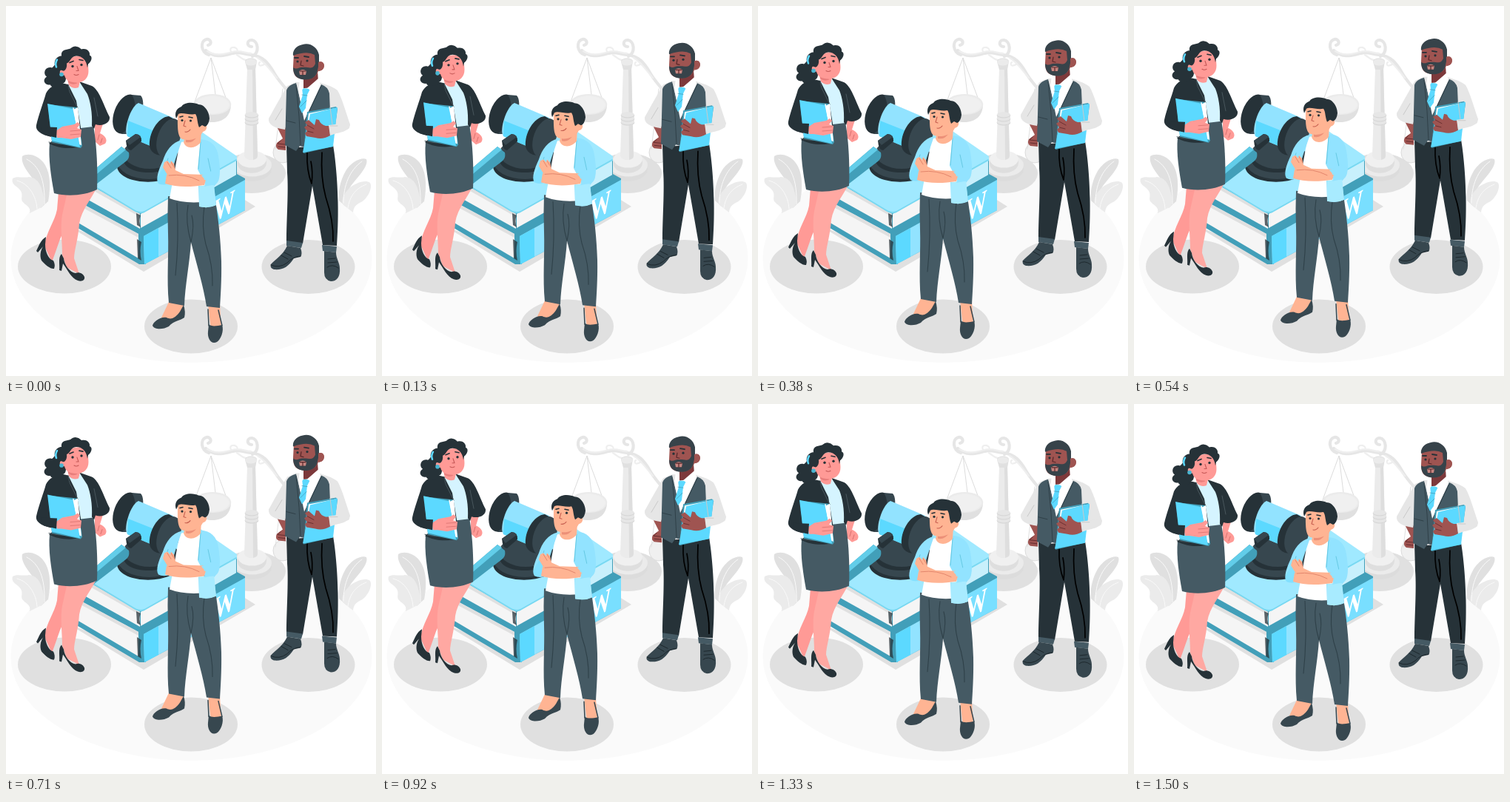
Write an HTML page that moves like this. It is 500 px wide and 500 px high and loops after 1.54 s.

```html
<!DOCTYPE html>
<html lang="en">
<head>
<meta charset="utf-8">
<title>Law team</title>
<style>
html, body { margin: 0; width: 100%; height: 100%; overflow: hidden; background: #fff; }
svg { display: block; width: 100vw; height: 100vh; }
.dark { fill: #263238; }
.slate { fill: #455a64; }
.shoe { fill: #37474f; }
.sky { fill: #5cd9ff; }
.ice { fill: #92e3ff; }
.teal { fill: #429fb9; }
.white { fill: #fff; }
.paper { fill: #f5f5f5; }
.shade { fill: #e0e0e0; }
.pink { fill: #ff9a96; }
.rose { fill: #ffa8a2; }
.peach { fill: #ffb493; }
.brown { fill: #9f5451; }
.deep { fill: #7d393b; }
.ln { fill: none; stroke-linecap: round; stroke-linejoin: round; }
</style>
</head>
<body>
<svg viewBox="0 0 500 500" xmlns="http://www.w3.org/2000/svg">
  <ellipse cx="250.5" cy="341" rx="244" ry="141" fill="#fafafa"/>

  <g id="plants">
    <path fill="#e0e0e0" d="M22 203C29 198 45 201 53 215C61 229 60 248 57 264L47 273C44 262 47 251 42 242C35 230 19 215 22 203Z"/>
    <path fill="#ebebeb" d="M9 233C14 229 25 233 31 231C40 231 47 240 49 250C52 259 52 266 50 271L32 280C34 271 27 270 24 266C18 261 24 257 20 250C17 244 6 242 9 233Z"/>
    <path class="ln" stroke="#fafafa" d="M28 207C45 216 53 235 52 268M15 236C31 240 41 257 42 274"/>
    <path fill="#e0e0e0" d="M487 207C480 204 466 211 459 223C451 237 449 251 450 263L459 271C465 262 461 252 465 245C472 234 491 217 487 207Z"/>
    <path fill="#ebebeb" d="M492 239C486 234 472 239 464 246C456 254 453 262 455 268L469 279C470 270 474 268 480 265C488 261 496 246 492 239Z"/>
    <path class="ln" stroke="#fafafa" d="M481 210C464 222 456 243 456 266M487 241C470 247 464 260 462 273"/>
  </g>

  <g id="shadows" class="shade">
    <ellipse cx="79" cy="352" rx="63" ry="36.5"/>
    <ellipse cx="408.5" cy="352.5" rx="63" ry="36.5"/>
    <ellipse cx="250" cy="433" rx="63" ry="36.5"/>
    <ellipse cx="332" cy="226" rx="46" ry="27"/>
    <path d="M84 297L186 359L337 271L318 259L180 335Z"/>
  </g>

  <g id="scale">
    <path class="ln" stroke="#e6e6e6" stroke-width="4.2" d="M274 66C263 63 262 47 271 45C277 44 279 52 273 53M270 60C283 72 297 66 306 64C317 61 323 66 331 66C347 67 355 78 362 90C367 99 373 105 379 113M333 68C343 63 341 47 332 46C325 46 325 55 332 55"/>
    <path class="ln" stroke="#efefef" stroke-width="2.3" d="M272 61C285 69 298 64 306 62C317 59 323 64 331 64M304 62C300 54 313 54 313 61M340 70C352 77 360 91 366 97M312 66C320 72 323 74 329 73M350 78C342 84 340 78 343 76"/>
    <path fill="none" stroke="#dcdcdc" d="M277 70L254 132M277 70L300 132M277 70L283 120"/>
    <path fill="#e0e0e0" d="M253.5 133C253 149 265 157 279 157C294 157 304 148 304 133Z"/>
    <ellipse cx="279" cy="133" rx="25.3" ry="14" fill="#ebebeb"/>
    <ellipse cx="279" cy="133.5" rx="23" ry="12" fill="#f0f0f0"/>
    <ellipse cx="374" cy="198" rx="13" ry="14" fill="#f0f0f0" stroke="#dcdcdc"/>
    <path class="ln" stroke="#e0e0e0" d="M374 112L364 193"/>
    <path fill="#dcdcdc" d="M307 216V222C308 242 358 242 359 220V213Z"/>
    <ellipse cx="333" cy="215" rx="26" ry="15.5" fill="#ebebeb"/>
    <path fill="#dedede" d="M313 208V214C315 230 351 230 352 212V206Z"/>
    <ellipse cx="332.5" cy="207" rx="19.5" ry="11.5" fill="#f0f0f0"/>
    <path fill="#ebebeb" d="M326 84H337L340 202C340 210 323 210 322 202Z"/>
    <path fill="#dedede" d="M333 84H337L340 202C340 206 337 207 334 208Z"/>
    <path fill="#e6e6e6" d="M323 147C323 142 340 142 341 147V158C340 163 324 163 323 158Z"/>
    <path class="ln" stroke="#d5d5d5" d="M323 148C325 152 339 152 341 148M323 153C325 157 339 157 341 153M323 158C325 162 339 162 341 158"/>
    <path fill="#e0e0e0" d="M323 75C323 69 339 69 339 75L337 86H326Z"/>
    <ellipse cx="331" cy="76" rx="8" ry="4.5" fill="#ebebeb"/>
  </g>

  <g id="books">
    <path class="teal" d="M93 268L104 258L181 300L312 227L323 233V276L187 349L180 349L92 297V290L97 291L96 272Z"/>
    <path class="paper" d="M97 264L179 308V341L96 292Z"/>
    <path class="shade" d="M97 264L179 308V313L97 269Z"/>
    <path class="teal" d="M179 312Q186 309 189 309V349L179 348Z"/>
    <path class="dark" opacity=".75" d="M177 315L183 319Q180 331 183 344L178 341Z"/>
    <path class="ice" d="M186 311L323 235V276L187 349Z"/>
    <path class="sky" d="M186 311L206 300V339L187 349Z"/>
    <path class="sky" opacity=".45" d="M264 268L323 235V276L264 308Z"/>
    <text text-anchor="end" transform="matrix(.7 -.4 0 1 310 275.5)" font-family="'Liberation Serif', 'Noto Serif', serif" font-weight="700" font-size="42" fill="#fff">LAW</text>
    <path class="teal" d="M103 257L114 240L180 279L312 205V229L181 304L103 262Z"/>
    <path class="paper" d="M114 242L181 281V301L104 258Z"/>
    <path class="shade" d="M114 242L181 281V285L112 246Z"/>
    <path class="dark" opacity=".75" d="M176 280L182 283Q179 290 182 299L177 296Z"/>
    <path class="paper" d="M182 281L311 207V228L182 300Z"/>
    <path fill="#c8f0fc" d="M264 236L311 207V228L264 255Z"/>
    <path fill="#a0e9ff" d="M114 239L246 163Q251 161 257 165L312 203V209L187 278Q180 281 173 277Z"/>
    <path class="ln" stroke="#78d8f1" stroke-width="2" d="M115 241L173 276Q180 281 187 278L311 208"/>
  </g>

  <g id="gavel">
    <path class="dark" d="M150 212V217C153 245 234 245 237 214V208Z"/>
    <ellipse cx="193.5" cy="209" rx="43.5" ry="25" class="shoe"/>
    <path class="dark" d="M159 202V209C162 231 228 231 229 205V200Z"/>
    <ellipse cx="194" cy="199" rx="35" ry="21" class="shoe"/>
    <path class="teal" d="M156 190L166 198C167 203 166 207 162 210L114 247C107 252 96 245 101 237Z"/>
    <path fill="#62cde9" d="M156 190L162 194L105 242C101 245 98 241 101 237Z"/>
    <ellipse cx="161.5" cy="146" rx="15.5" ry="27.5" transform="rotate(20 161.5 146)" class="dark"/>
    <path class="shoe" d="M170 120L182 121C190 129 183 163 168 173L155 173C170 166 181 137 170 120Z"/>
    <path class="ice" d="M179 131L226 151C232 166 220 193 207 194L164 176C158 168 168 136 179 131Z"/>
    <path class="sky" d="M164 176L165 155L213 174L207 194Z"/>
    <path class="dark" d="M194 190C192 173 205 150 220 149L231 155L216 203L204 201Q196 198 194 190Z"/>
    <ellipse cx="220" cy="178" rx="15" ry="27" transform="rotate(20 220 178)" class="shoe"/>
    <path class="dark" d="M162 182L175 173Q184 174 183 183L169 195Q163 195 162 182Z"/>
    <path class="shoe" d="M162 182L175 173Q180 173 182 177L167 188Z"/>
  </g>

  <g class="float" id="woman">
    <path class="pink" d="M71 251L99 254C95 279 80 299 73 315L66 335L62 346L52 324C54 306 66 291 69 275Z"/>
    <path class="rose" d="M83 251L123 244C117 259 102 275 99 294C98 313 92 331 92 341L99 362L82 353L76 336C76 318 73 298 76 282Z"/>
    <path class="dark" d="M54 312C47 316 45 323 41 331L43 333L50 325C47 330 45 337 48 344C53 350 61 356 65 355Q67 350 64 344C57 342 53 332 53 322Z"/>
    <path class="dark" d="M75 335C70 340 73 350 72 357L75 358L77 348C83 356 88 368 97 371C103 373 107 370 106 366C104 361 98 359 94 361C86 360 79 350 78 341Z"/>
    <path class="pink" d="M120 155L132 156L127 172C134 175 138 181 134 186L127 189L120 183Z"/>
    <path class="ln" stroke="#d9716f" d="M126 174L124 181M130 179L128 185"/>
    <path class="slate" d="M59 185L101 163L118 162C123 188 124 225 123 248C107 256 83 258 65 253C61 231 57 207 59 185Z"/>
    <path fill="#d5f4ff" d="M83 106L101 105L113 118L118 163L101 165L94 134Z"/>
    <path class="dark" d="M75 104L84 106L95 128L101 164L102 190C86 194 70 192 58 186L68 178C52 176 39 170 41 161C44 147 51 129 54 118C58 110 66 106 75 104Z"/>
    <path class="dark" d="M99 102L116 108C126 113 131 132 140 150C141 158 131 163 121 160L119 166L116 162C117 145 114 129 110 119Z"/>
    <path class="ln" stroke="#48565c" stroke-width="1" d="M84 106L86 116L97 138M64 139Q63 152 60 157M119 124L124 149M58 184Q73 188 85 186"/>
    <path class="pink" d="M81 92L101 98L98 110Q91 113 85 107Z"/>
    <path fill="#e87e7c" d="M84 98L97 104Q90 108 84 103Z"/>
    <g transform="translate(0 1.5)">
      <path class="dark" d="M75 68C68 72 66 80 62 82C53 79 49 90 55 94C48 99 53 106 60 105C61 110 76 109 77 103C83 101 81 91 79 86Z"/>
      <path class="pink" d="M78 74C88 65 104 63 110 73C111 82 114 91 107 98Q100 104 88 101C81 99 80 95 79 92C73 94 70 86 76 84Z"/>
      <path class="dark" d="M68 83C62 73 69 66 75 66C74 56 83 58 87 56C93 50 99 54 102 57C110 55 114 61 113 65C118 67 115 74 111 77L110 82C109 72 103 66 95 66C87 66 87 75 82 76C83 83 79 87 77 86Z"/>
      <path class="ln" stroke="#5cd9ff" stroke-width="2.5" d="M69 71Q66 76 68 81"/>
      <circle cx="75" cy="91" r="2.8" fill="#48b5d1"/>
      <circle cx="90" cy="80" r="1.7" class="dark"/><circle cx="102" cy="78" r="1.7" class="dark"/>
      <path class="ln" stroke="#263238" stroke-width="1.7" d="M86 75L91 73M99 71L104 72"/>
      <path class="ln" stroke="#c45857" stroke-width="1.1" d="M96 80L98 86L95 86M92 91Q95 93 98 91"/>
    </g>
    <path class="teal" d="M57 133L96 137L103 189L101 192L62 184Z"/>
    <path class="white" d="M91 140L97 137L102 188L98 187Z"/>
    <path class="sky" d="M56 132L91 139L100 191L62 182Z"/>
    <path class="ln" stroke="#fff" stroke-width="1.5" d="M91 138L96 162"/>
    <path class="pink" d="M67 169L76 163L92 160L97 157L100 160L96 165L102 167L101 177L88 180L75 178L69 178Z"/>
    <path class="ln" stroke="#d9716f" stroke-width=".8" d="M87 169L100 168M87 174L100 173"/>
    <path class="dark" d="M47 163L69 164L68 178L51 174Z"/>
  </g>

  <g class="float" id="man">
    <path class="brown" d="M366 163L378 160V195L368 194Q363 191 366 185L374 179Z"/>
    <path class="ln" stroke="#652d2f" d="M371 182L367 186L377 187M368 190L377 191"/>
    <path class="dark" d="M379 187L442 188C445 205 448 235 448.500 265C449 290 448 308 447 324L428 323L414 243L401 321L379 319C379 290 382 250 380 225Z"/>
    <path class="ln" stroke="#000" stroke-width="1.700" d="M407 198Q406 222 413 240Q415 224 412 210M427 198Q425 232 432 258Q443 291 442 318"/>
    <path class="slate" d="M379 317L401 320L399 327L379 324ZM427 323L447 325L446 333L428 331Z"/>
    <path class="shoe" d="M380 324L398 327Q401 335 398 339L389 341C381 353 374 357 362 356Q356 354 358 349C364 342 374 337 380 324Z"/>
    <path class="shoe" d="M430 331L446 333C446 341 451 347 451 354C452 366 447 372 439 372Q430 370 430 360Z"/>
    <path class="ln" stroke="#1d282d" stroke-width="1" d="M372 337L381 342M376 333L386 338M358 350Q369 355 380 347Q387 339 398 338M435 342L445 341M435 347L447 346M434 353Q441 348 449 354"/>
    <path fill="#e6e6e6" d="M392 103L380 108C371 123 360 143 355 152C354 160 362 165 377 167L386 136L396 191L440 188L438 173C453 172 465 168 465 160C460 146 454 124 448 114C441 108 430 106 421 102Z"/>
    <path class="slate" d="M392 104C386 106 381 108 379 114L377 188L392 196L397 189L408 192L440 189L437 118Q435 109 426 106L404 152Z"/>
    <path class="white" d="M397 100L423 100L425 107L403 155L395 115Z"/>
    <path class="ln" stroke="#2f4048" stroke-width="1" d="M392 107L396 149L398 188M426 108L407 148M379 155L391 158"/>
    <path class="sky" d="M400 111L411 112L407 120L405 138L400 145L396 136L401 120Z"/>
    <path class="ln" stroke="#429fb9" stroke-width=".8" d="M400 120L407 121M398 136L406 128"/>
    <path class="deep" d="M402 94L421 88L422 102Q413 112 402 111Z"/>
    <path class="white" d="M422 98L425 108L416 117L407 111ZM397 101L402 111L396 119Z"/>
    <g transform="translate(0 1)">
      <path class="brown" d="M389 62L419 59L422 75C432 71 433 87 422 87C420 94 413 99 404 98C392 98 388 93 388 81Z"/>
      <path fill="#37434a" d="M388 66C387 60 391 53 401 51C411 48 421 55 423 65V76L421 86C420 94 414 98 406 98.500C393 99 388 92 388 82C393 86 397 81 401 82C409 81 414 86 418 77L417 65Q407 59 388 66Z"/>
      <path class="brown" d="M422 75C432 71 433 87 422 87Z"/>
      <path fill="#c68580" d="M396 87Q401 83 406 87L405 92L397 92Z"/>
      <path class="ln" stroke="#572629" stroke-width="1.200" d="M397 87L405 87M401 87V92M399 73L398 79L402 80"/>
      <circle cx="394" cy="74" r="1.600" class="dark"/><circle cx="407" cy="73" r="1.600" class="dark"/>
      <path class="ln" stroke="#263238" stroke-width="1.800" d="M390 69L395 69M403 67L409 68"/>
    </g>
    <path class="teal" d="M407 143L446 136L448 139L441 190L402 199Z"/>
    <path class="white" d="M409 145L445 138L440 186L403 195Z"/>
    <path class="sky" d="M411 146L448 137L442 190L401 198Z"/>
    <path class="brown" d="M437 162L438 175Q428 181 418 178L406 176L404 172L407 169L403 164L407 161L404 157L409 154L417 161L419 153L423 154Q425 160 432 162Z"/>
    <path class="ln" stroke="#652d2f" stroke-width=".9" d="M407 161L416 166M407 169L415 171"/>
    <path fill="#e6e6e6" d="M436 161L462 158Q467 165 461 167L438 175Z"/>
    <path class="ln" stroke="#c9c9c9" stroke-width="1" d="M438 137L441 160M438 162L448 162M373 139L364 154"/>
  </g>

  <g class="float" id="lead">
    <path class="peach" d="M220 400L240 402L239 413L218 428L210 421Z"/>
    <path class="peach" d="M273 403L289 404L291 438L277 438Z"/>
    <path class="shoe" d="M240 404L235 413C230 420 224 425 217 421C210 419 199 426 198 432C201 438 213 437 220 433C227 425 236 425 241 421Q243 413 240 404Z"/>
    <path class="shoe" d="M274 430C278 434 286 432 292 431C295 439 290 451 285 454C277 458 272 449 273 440Z"/>
    <path class="ln" stroke="#37474f" stroke-width="1.500" d="M274 432L273 410M292 432L287 411"/>
    <path class="slate" d="M219 257L283 263C287 288 290 315 291 345C291.500 370 290 391 289 408L271 406C267 379 257 347 250 319C248 349 242 377 241 405L220 401C217 370 220 337 219 307Q218 281 219 257Z"/>
    <path class="ln" stroke="#2f4149" stroke-width="1.100" d="M246 269Q242 292 250 319Q255 296 251 283M231 266Q234 316 229 364M268 271Q264 299 270 322Q280 351 279 378"/>
    <path class="white" d="M235 184L263 182L270 211L265 265Q239 267 221 260Z"/>
    <path class="ice" d="M238 181C224 184 216 196 212 209C206 222 202 233 206 240Q212 243 219 241L229 207Z"/>
    <path class="sky" opacity=".3" d="M214 216L219 224L216 241Q204 243 204 234Z"/>
    <path class="ice" d="M263 180C277 181 285 189 287 203C289 216 291 232 285 239L281 244L284 269Q274 274 261 271L260 243L271 244L259 221Z"/>
    <path fill="#a8ebff" d="M261 243L281 242L284 269Q274 274 261 271Z"/>
    <path class="ln" stroke="#60c6df" stroke-width=".9" d="M263 184L260 220M273 206L278 229M219 206L216 216"/>
    <path class="peach" d="M243 173L264 169L263 184C257 193 243 194 240 184Z"/>
    <path fill="#ec9078" d="M243 179L258 177Q252 186 243 184Z"/>
    <path class="peach" d="M232 145C238 139 257 140 263 147L264 162C271 154 275 168 266 170C261 180 247 183 238 180C231 176 232 161 232 145Z"/>
    <path class="dark" d="M230 152C227 144 231 138 237 136C241 129 255 130 260 133C269 133 275 144 275 152Q274 161 269 163L265 161L261 164C258 157 259 150 256 146C248 148 238 143 233 146Z"/>
    <circle cx="238" cy="154.500" r="1.600" class="dark"/><circle cx="249.500" cy="155" r="1.600" class="dark"/>
    <path class="ln" stroke="#263238" stroke-width="1.600" d="M235 150L239 149M247 150L252 151"/>
    <path class="ln" stroke="#c65f50" stroke-width="1.100" d="M242 155L240 162L243 163M242 170Q246 171 249 167"/>
    <path class="peach" d="M214 211L218 209L222 213L223 209L227 213L229 222L240 227L269 228L267 238L228 240L218 228L212 218Z"/>
    <path class="peach" d="M217 228C230 224 247 229 259 235L270 235L268 242C249 245 229 245 215 240Z"/>
    <path class="ln" stroke="#df8068" stroke-width=".9" d="M218 211L223 219M223 211L228 219M220 229Q242 226 261 236"/>
    <path class="ice" d="M264 229L280 222L287 225Q290 238 282 241L268 244L271 237Z"/>
  </g>
</svg>
<script>
const LOOP = 1540, CYCLE = 1500, RISE = 10, STEPS = 37;
const people = document.querySelectorAll('.float');

// Linear up-and-down hover, stepped at about 24 pictures per second.
function draw(ms) {
  const step = Math.floor((ms % LOOP + 2.5) / LOOP * STEPS) % STEPS;
  const phase = step / 24 * 1000 / CYCLE;
  const y = -RISE * (1 - Math.abs(1 - 2 * phase));
  for (const p of people) p.setAttribute('transform', `translate(0 ${y.toFixed(3)})`);
}

const start = performance.now();
function tick(now) {
  draw(Math.max(0, now - start));
  requestAnimationFrame(tick);
}
draw(0);
requestAnimationFrame(tick);
</script>
</body>
</html>
```
